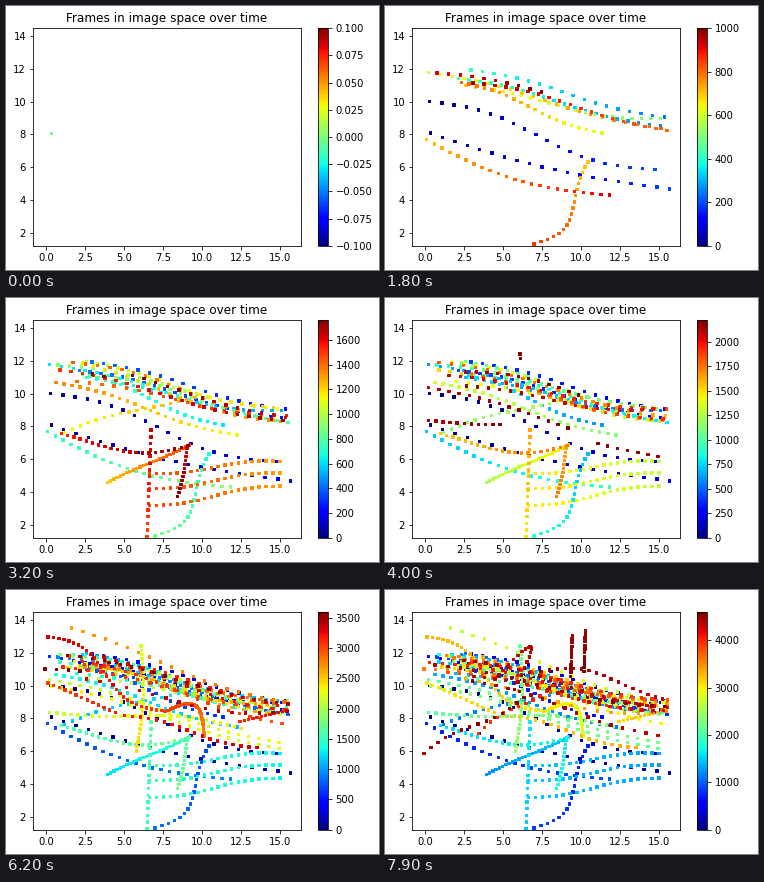
A matplotlib script for the animation above (8 s loop, 373 by 264 pixels).

```python
import numpy as np
import matplotlib.pyplot as plt
from matplotlib.animation import FuncAnimation

W, H, DPI = 373, 264, 72
FRAMES, INTERVAL = 80, 100
STEP = 10  # clock ticks between two samples of a walker

rng = np.random.default_rng(4)
samples = []


def stroll(t, a, b, pace=0.75, sag=0.0, wave=0.2):
    """Walk from a to b; sag bows the path to its left, wave bends it like an S."""
    a, b = np.array(a), np.array(b)
    way = b - a
    dist = np.hypot(*way)
    left = np.array([-way[1], way[0]]) / dist
    u = np.linspace(0, 1, int(round(dist / pace)) + 1)[:, None]
    xy = a + way * u + left * (sag * np.sin(np.pi * u) + wave * np.sin(2 * np.pi * u))
    for i, (x, y) in enumerate(xy):
        samples.append((t + i * STEP, x, y))
    return t + len(xy) * STEP


# first walkers
stroll(0, (0.3, 8.1), (15.65, 4.7), 0.82, -0.45, 0)
stroll(10, (0.25, 10.05), (14.7, 5.9), 0.79, -0.15, 0.45)
stroll(240, (15.3, 9.1), (2.9, 11.95))
stroll(250, (15.05, 8.55), (2.1, 11.45), 0.7)
stroll(490, (15.05, 9), (2.6, 11), 0.6, 0.3)
stroll(610, (0.2, 11.8), (15.1, 8.4))
stroll(610, (11.3, 8.1), (2.3, 11.2), 0.5)

# main stream along the pavement, both ways
for t in range(790, 4480, 120):
    ends = [(rng.uniform(0.2, 3.2), rng.uniform(10.3, 12)),
            (rng.uniform(14, 15.5), rng.uniform(8.2, 9.2))]
    start, stop = ends[::rng.choice([-1, 1])]
    stroll(t, start, stop, rng.uniform(0.65, 0.85), rng.normal(0, 0.2))

# lower street
stroll(690, (10.4, 6.35), (6.95, 1.35), 0.36, 0.9, -0.35)
stroll(700, (0.05, 7.7), (11.8, 4.32), 0.55, -0.75, 0)
stroll(1230, (3.9, 4.6), (9.15, 6.9), 0.23, 0, 0.05)
for y in (5.9, 5.18, 4.38):
    stroll(1300, (14.95, y), (6.6, 1.3 * y - 2.5), 0.45, 0, -0.15)
stroll(1480, (6.45, 1.3), (6.7, 7.8), 0.4, 0, 0)
stroll(1550, (0.95, 7.6), (9.05, 6.85), 0.4, -0.7, 0.1)
stroll(1630, (9, 6.7), (8.4, 3.75), 0.25, 0.1, 0)

# crossing the middle
stroll(1120, (1.15, 7.65), (9.5, 9.8), 0.55, 0.2, 0.1)
stroll(1130, (12.2, 7.5), (0.6, 10.7), 0.53)
stroll(2080, (0.2, 10.4), (14.9, 6.55), 0.65)
stroll(2120, (0.2, 8.4), (12.5, 7.4), 0.45, 0.3, -0.2)
stroll(2160, (14.9, 6.2), (0.3, 10), 0.65)
stroll(2210, (6.05, 12.45), (5.75, 6.05), 0.27, 0.3, 0)
stroll(2660, (1.6, 13.55), (15.3, 9.05), 0.75, -0.3)
stroll(2960, (15.1, 7.7), (2.3, 11.5), 0.7)
stroll(3150, (12.4, 7.85), (15.4, 8.5), 0.28, 0, 0)

# slow wanderer: an arch, then away to the upper left
t = stroll(2780, (10.1, 6.95), (7.6, 8.45), 0.11, -1.3, 0)
stroll(t, (7.4, 8.5), (0.1, 13), 0.32, 0, 0.6)
t = stroll(3040, (0.1, 10.2), (4.4, 8.4), 0.38, 0, 0)
stroll(t, (5, 8.2), (13.5, 6.25), 0.5)

# late arrivals
stroll(3560, (-0.1, 11.05), (15.5, 9.15))
stroll(3940, (3.4, 7.1), (8.5, 10.4), 0.5)
stroll(4250, (4.6, 10.6), (5.7, 9.8), 0.08, 2.7, 0)
stroll(4330, (14.9, 7), (3, 10.3))
stroll(4320, (15.2, 9.2), (7.4, 10.9), 0.5, -0.6)
stroll(4440, (-0.1, 5.9), (6.3, 9.3), 0.55)
for x, y in ((9.4, 13.1), (10.25, 13.4)):
    stroll(4480, (x, y), (x - 0.1, y - 2.5), 0.23, 0, 0)

samples = np.array(sorted(samples))
times, spots = samples[:, 0], samples[:, 1:]

# clock reached at each frame; it runs faster when few people are in view
clock = np.interp(np.arange(FRAMES), [0, 11, 25, 40, 54, 69, 79],
                  [0, 630, 1366, 2217, 3048, 4058, 4594])
clock = np.round(clock / STEP) * STEP

plt.rcParams.update({"font.family": "DejaVu Sans", "font.size": 10})
fig = plt.figure(figsize=((W + 0.01) / DPI, (H + 0.01) / DPI), dpi=DPI, facecolor="white")


def panel(x, w):
    return fig.add_axes([x / W, 24.3 / H, w / W, 217.44 / H])


ax, cax = panel(27, 267.84), panel(311.58, 10.87)
dots = ax.scatter(*spots.T, c=times, s=6, marker="s", cmap="jet")
ax.set(xlim=(-0.84, 16.33), ylim=(1.205, 14.475))
ax.set_title("Frames in image space over time", fontsize=12)
fig.colorbar(dots, cax=cax)


def update(k):
    now = clock[k]
    count = np.searchsorted(times, now, side="right") if k else 1
    dots.set_offsets(spots[:count])
    dots.set_array(times[:count])
    dots.set_clim(*((0, now) if k else (-0.1, 0.1)))
    return (dots,)


anim = FuncAnimation(fig, update, frames=FRAMES, interval=INTERVAL,
                     init_func=lambda: update(0), repeat=True, repeat_delay=0, blit=False)
plt.show()
```
